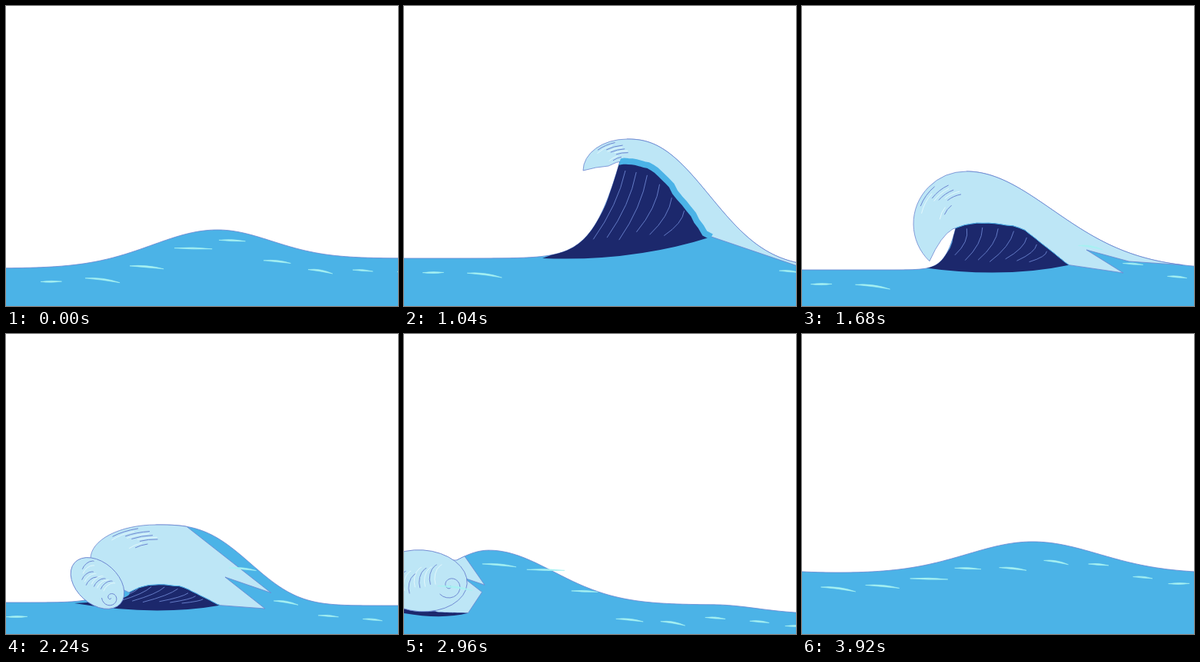
Write an HTML page with a canvas that moves like this. It is 510 px wide and 390 px high and loops after 4000 ms.

```html
<!DOCTYPE html>
<html lang="en">
<head>
<meta charset="utf-8">
<title>Rolling wave</title>
<style>
html, body { margin: 0; width: 100%; height: 100%; overflow: hidden; background: #fff; }
canvas { display: block; }
</style>
</head>
<body>
<canvas id="stage" width="510" height="390"></canvas>
<script>
const ctx = document.getElementById('stage').getContext('2d');
const LOOP = 4000, STEP = 80, TOP = -Math.PI / 2;
const SEA = '#4bb3e7', FOAM = '#bde6f6', DARK = '#1c286c', LINE = '#6b84d0', SHINE = '#e4f8fc', GLINT = '#a6f1f2';

// The main swell: pairs hold the left and the right side of the crest.
const swell = [
  { t: 0, x: 275, top: 291, level: [341, 328], width: [120, 100], power: [2, 2] },
  { t: 560, x: 285, top: 247, level: [335, 331], width: [80, 105], power: [1.7, 2] },
  { t: 1040, x: 290, top: 173, level: [328, 340], width: [34, 135], power: [1.2, 2.4] },
  { t: 1680, x: 214, top: 215, level: [343, 342], width: [16, 158], power: [1.2, 2] },
  { t: 2240, x: 195, top: 248, level: [349, 353], width: [40, 142], power: [1.5, 3] },
  { t: 2640, x: 165, top: 274, level: [349, 364], width: [100, 132], power: [2, 2] },
  { t: 3360, x: 42, top: 290, level: [320, 337], width: [56, 103], power: [2, 2] },
  { t: 3920, x: -130, top: 300, level: [311, 311], width: [100, 100], power: [2, 2] }
];

// The next swell, as an offset on top of the main one
const nextSwell = [
  { t: 0, x: 420, top: 0, level: [0, 0], width: [120, 80], power: [2, 2] },
  { t: 2640, x: 420, top: 0, level: [0, 0], width: [120, 80], power: [2, 2] },
  { t: 3360, x: 380, top: 0, level: [0, 27], width: [120, 80], power: [2, 2] },
  { t: 3920, x: 300, top: -41, level: [0, 0], width: [120, 122], power: [2, 2] }
];

// The breaking crest: an elliptic hood, the dark face below it, the ragged foam end
const breaker = [
  { t: 480, x: 283, r: [2, 1], sweep: 1.5, fade: 295, notch: [298, 262], toe: [300, 262],
    lip: [281, 258], shoulder: [286, 258], heel: [290, 260], foot: [278, 262], rim: 0 },
  { t: 1040, x: 290, r: [57, 41], sweep: 1.57, fade: 510, notch: [512, 337], toe: [512, 338],
    lip: [266, 208], shoulder: [328, 214], heel: [397, 303], foot: [180, 328], rim: 8 },
  { t: 1680, x: 214, r: [69, 68], sweep: 2.37, fade: 495, notch: [370, 317], toe: [418, 347],
    lip: [196, 290], shoulder: [290, 292], heel: [347, 337], foot: [157, 340], rim: 1 },
  { t: 2240, x: 195, r: [85, 44], sweep: 1.57, fade: 235, notch: [285, 316], toe: [337, 357],
    lip: [160, 336], shoulder: [238, 333], heel: [278, 353], foot: [89, 350], rim: 1 },
  { t: 2640, x: 140, r: [95, 30], sweep: 1.57, fade: 150, notch: [140, 313], toe: [165, 324],
    lip: [60, 348], shoulder: [115, 355], heel: [150, 357], foot: [39, 347], rim: 0 },
  { t: 3360, x: -20, r: [95, 30], sweep: 1.57, fade: -10, notch: [0, 322], toe: [22, 350],
    lip: [-110, 365], shoulder: [-50, 370], heel: [0, 370], foot: [-130, 365], rim: 0 }
];

const roller = [
  { t: 1760, x: 160, y: 335, r: [2, 2], turn: 1 },
  { t: 2240, x: 119, y: 324, r: [40, 27], turn: 0.73 },
  { t: 2640, x: 92, y: 315, r: [60, 40], turn: 0.44 },
  { t: 3360, x: -65, y: 328, r: [60, 40], turn: -0.4 }
];

const rand = i => { const v = Math.sin(i * 127.1) * 43758.5; return v - Math.floor(v); };

// Interpolates numbers, arrays and objects alike.
function mix(a, b, u) {
  if (typeof a === 'number') return a + (b - a) * u;
  if (Array.isArray(a)) return a.map((v, i) => mix(v, b[i], u));
  return Object.fromEntries(Object.keys(a).map(k => [k, mix(a[k], b[k], u)]));
}

function pose(keys, t) {
  const i = keys.findIndex((k, n) => n && k.t >= t);
  if (i < 0 || t < keys[0].t) return null;
  const a = keys[i - 1], b = keys[i];
  return mix(a, b, (t - a.t) / (b.t - a.t));
}

function hill(h, x) {
  const side = x < h.x ? 0 : 1;
  const fall = 1 - Math.exp(-((Math.abs(x - h.x) / h.width[side]) ** h.power[side]));
  return h.top + (h.level[side] - h.top) * fall;
}

function surface(t) {
  const main = pose(swell, t), next = pose(nextSwell, t);
  return x => hill(main, x) + hill(next, x);
}

function stroke(path, color, width) {
  ctx.strokeStyle = color;
  ctx.lineWidth = width;
  ctx.stroke(path);
}

function fill(path, color) {
  ctx.fillStyle = color;
  ctx.fill(path);
}

function clipped(path, paint) {
  ctx.save();
  ctx.clip(path);
  paint();
  ctx.restore();
}

// Lower edge of the foam: an arch from lip to shoulder, then down to the heel
function belly(b, u) {
  const jag = b.rim * 0.4 * rand(Math.round(u * 24));
  if (u > 0.5) {
    const [x, y] = mix(b.shoulder, b.heel, u * 2 - 1);
    return [x + jag, y - jag];
  }
  const [x, y] = mix(b.lip, b.shoulder, u * 2);
  return [x, y - 32 * u * 2 * (1 - u * 2) - 1.5 * rand(Math.round(u * 24))];
}

function bellyPoints(b) {
  return Array.from({ length: 25 }, (_, i) => belly(b, i / 24));
}

function foamPath(b, y) {
  const path = new Path2D(), [rx, ry] = b.r, cy = y(b.x) + ry, tip = TOP - b.sweep;
  path.ellipse(b.x, cy, rx, ry, 0, tip, TOP);
  for (let x = b.x; x < b.fade; x += 3) path.lineTo(x, y(x));
  path.lineTo(b.fade, y(b.fade));
  path.lineTo(b.notch[0] + (b.toe[0] - b.notch[0]) * 1.15, (b.notch[1] + b.toe[1]) / 2);
  path.lineTo(...b.notch);
  path.lineTo(...b.toe);
  for (const p of bellyPoints(b).reverse()) path.lineTo(...p);
  const tipX = b.x + rx * Math.cos(tip), tipY = cy + ry * Math.sin(tip);
  path.quadraticCurveTo((b.lip[0] + tipX) / 2, b.lip[1] * 0.8 + tipY * 0.2, tipX, tipY);
  return path;
}

function facePath(b) {
  const path = new Path2D(), inset = b.rim * 0.8;
  path.moveTo(...b.foot);
  path.quadraticCurveTo(b.lip[0] + 4, b.lip[1] * 0.25 + b.foot[1] * 0.75, b.lip[0] + inset, b.lip[1]);
  for (const p of bellyPoints(b)) path.lineTo(Math.max(p[0], b.lip[0] + inset), p[1]);
  const [x, y] = mix(b.foot, b.heel, 0.45);
  path.quadraticCurveTo(x + 20, y + 16, ...b.foot);
  return path;
}

function drawHoodLines(b, y) {
  const [rx, ry] = b.r;
  for (let i = 0; i < 9; i++) {
    const size = 0.93 - 0.06 * i, from = TOP - b.sweep * (0.2 + 0.4 * rand(i + 3));
    const arc = new Path2D();
    arc.ellipse(b.x, y(b.x) + ry, rx * size, ry * size, 0, from, from + 0.5);
    stroke(arc, i % 2 ? SHINE : LINE, 1);
  }
}

function drawRibs(b) {
  for (let i = 1; i < 8; i++) {
    const u = i / 9, top = belly(b, u), low = mix(b.foot, b.heel, u * 0.75 + 0.1);
    const a = mix(top, low, 0.1), c = mix(top, low, 0.65 + 0.25 * rand(i));
    const rib = new Path2D();
    rib.moveTo(...a);
    rib.quadraticCurveTo((a[0] + c[0]) / 2 + 11, (a[1] + c[1]) / 2, ...c);
    stroke(rib, LINE, 0.9);
  }
}

function drawBreaker(b, y, sea) {
  const foam = foamPath(b, y), face = facePath(b);
  fill(foam, FOAM);
  stroke(foam, LINE, 0.8);
  clipped(foam, () => drawHoodLines(b, y));
  clipped(sea, () => {
    fill(face, DARK);
    clipped(face, () => drawRibs(b));
    if (b.rim > 0) {
      const rim = new Path2D();
      for (const p of bellyPoints(b)) rim.lineTo(...p);
      stroke(rim, SEA, b.rim);
    }
  });
}

function drawRoller({ x, y, r: [rx, ry], turn }) {
  ctx.save();
  ctx.translate(x, y);
  ctx.rotate(turn);
  const body = new Path2D();
  body.ellipse(0, 0, rx, ry, 0, 0, 7);
  fill(body, FOAM);
  stroke(body, LINE, 0.9);
  for (let i = 0; i < 10; i++) {
    const arc = new Path2D();
    arc.ellipse((0.11 * i - 0.5) * rx, (rand(i) - 0.5) * 0.5 * ry, rx * 0.2, ry * 0.45, 0, 2.6, 4.4);
    stroke(arc, i % 2 ? SHINE : LINE, 0.9);
  }
  const curl = new Path2D();
  for (let a = 0; a < 9; a += 0.3) {
    const size = ry * 0.05 * a;
    curl.lineTo(rx * 0.64 + size * Math.cos(a), ry * 0.1 + size * Math.sin(a));
  }
  stroke(curl, LINE, 0.9);
  ctx.restore();
}

// Short tapered highlights that drift left below the surface
function drawGlints(t, y, b) {
  for (let i = 0; i < 9; i++) {
    const x = (45 + i * 58 + 510 - t * 0.02) % 510, length = 18 + 34 * rand(i + 1);
    if (b && x + length > b.foot[0] - 10 && x < b.toe[0] - 60) continue;
    const top = y(x) + 9 + 20 * rand(i + 5), slope = 8 * rand(i + 9) - 2;
    const glint = new Path2D();
    glint.moveTo(x, top);
    glint.quadraticCurveTo(x + length / 2, top - 2, x + length, top + slope);
    glint.quadraticCurveTo(x + length / 2, top + 2, x, top);
    fill(glint, GLINT);
    stroke(glint, GLINT, 0.6);
  }
}

function draw(t) {
  const y = surface(t), b = pose(breaker, t), roll = pose(roller, t);
  const sea = new Path2D();
  for (let x = -4; x <= 514; x += 2) sea.lineTo(x, y(x));
  sea.lineTo(514, 400);
  sea.lineTo(-4, 400);
  sea.closePath();
  ctx.clearRect(0, 0, 510, 390);
  fill(sea, SEA);
  stroke(sea, LINE, 0.8);
  if (b) drawBreaker(b, y, sea);
  if (roll) drawRoller(roll);
  drawGlints(t, y, b);
}

const start = performance.now();
function tick() {
  const t = Math.floor((performance.now() - start) % LOOP / STEP) * STEP;
  draw(t === 3040 ? 2960 : t); // one pose is held for two steps
  requestAnimationFrame(tick);
}
tick();
</script>
</body>
</html>
```
